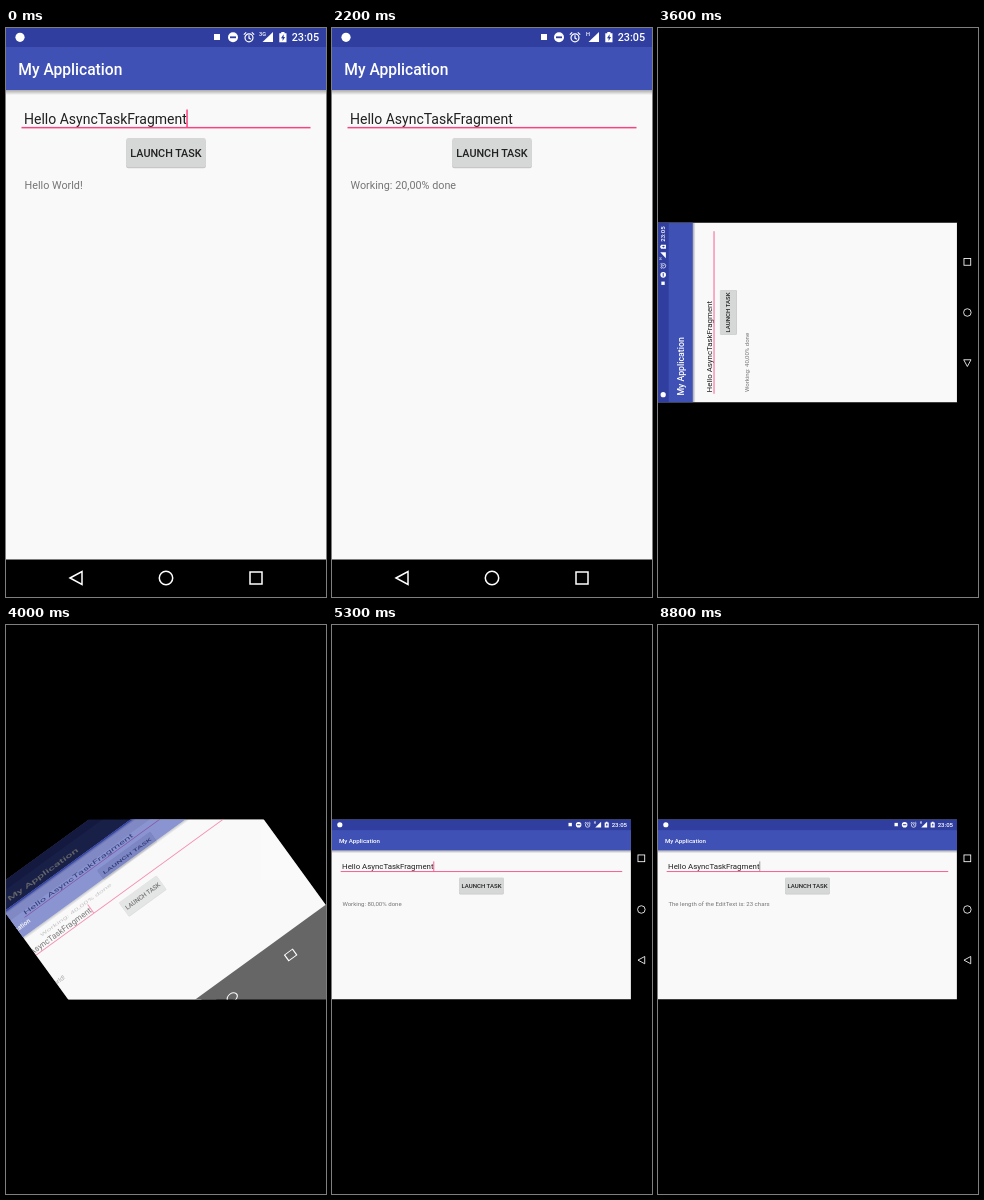
Recreate the animation shown at these times as an HTML page. Size 320 by 569 pixels, loop 8850 ms.

```html
<!DOCTYPE html>
<html lang="en">
<head>
<meta charset="utf-8">
<title>Task demo</title>
<style>
  html, body { margin: 0; height: 100%; overflow: hidden; background: #000; }
  svg { display: block; width: 100vw; height: 100vh; }
  text { font-family: Roboto, "Noto Sans", sans-serif; font-size: 10.8px; }
  .medium { font-weight: 500; }
  .icon { fill: none; stroke: #fff; stroke-width: 1.5; }
</style>
</head>
<body>
<svg id="stage" viewBox="0 0 320 569"></svg>
<script>
const LOOP = 8850, STEP = 50, FIT = 0.5625;
const TURN_START = 3931, TURN_TIME = 412;
const PAPER = '#f9f9f9';
const stage = document.getElementById('stage');
const $ = id => document.getElementById(id);

const back = (x, y) => `<path class="icon" d="M${x - 6} ${y}l12 -6.5v13z"/>`;
const home = (x, y) => `<circle class="icon" cx="${x}" cy="${y}" r="6.7"/>`;
const recent = (x, y) => `<rect class="icon" x="${x - 6}" y="${y - 6}" width="12" height="12"/>`;

const navBottom = `<rect y="531.5" width="320" height="38"/>
  ${back(70, 550)}${home(160, 550)}${recent(250, 550)}`;
const navRight = `<rect x="531.5" width="38" height="320"/>
  ${recent(550, 69)}${home(550, 160)}${back(550, 250)}`;

const statusIcons = id => `
  <rect id="${id}Radio" x="209" y="6" width="6" height="6" fill="#fff"/>
  <circle cx="227" cy="9.3" r="5" fill="#fff"/>
  <rect x="224" y="8.4" width="6" height="1.8" fill="#303f9f"/>
  <g fill="none" stroke="#fff" stroke-width="1.2">
    <circle cx="243" cy="9.8" r="4"/>
    <path d="M243 7.3v2.8l1.8 1.2M237.8 6.6l2.4 -2.2M248.2 6.6l-2.4 -2.2"/>
  </g>
  <text id="${id}Net" class="medium" x="254" y="7.6" fill="#fff" style="font-size:5.6px">H</text>
  <path d="M267 4v10h-10.5z" fill="#fff"/>
  <path d="M273.3 5.2h2v-1.2h3.2v1.2h2v9h-7.2z" fill="#fff"/>
  <path d="M277.6 6.3l-2.6 4h1.6v2.7l2.5 -4h-1.5z" fill="#303f9f"/>
  <text class="medium" x="285.7" y="13.2" fill="#fff">23:05</text>`;

// One app screen; lift is how much shorter its app bar is.
function screen(id, width, height, lift, titleSize, titleY) {
  const bar = 62 - lift, mid = width / 2, button = 110 - lift;
  return `
  <rect width="${width}" height="${height}" fill="${PAPER}"/>
  <rect y="${bar}" width="${width}" height="5" fill="url(#shade)"/>
  <rect width="${width}" height="${bar}" fill="#3f51b5"/>
  <rect width="${width}" height="19" fill="#303f9f"/>
  <circle cx="14" cy="9.3" r="4.6" fill="#fff"/>
  <g transform="translate(${width - 320})">${statusIcons(id)}</g>
  <text class="medium" x="12.3" y="${titleY}" fill="#fff" style="font-size:${titleSize}px">My Application</text>
  <g transform="translate(0 ${-lift})">
    <text x="18" y="95.8" fill="#202020" style="font-size:14px">Hello AsyncTaskFragment</text>
    <rect x="15.5" y="98.9" width="${width - 31}" height="1.5" fill="#f5457f"/>
    <rect id="${id}Cursor" x="180.3" y="81.5" width="1.5" height="17.5" fill="#ff4081"/>
    <text id="${id}Message" x="18.5" y="161.2" fill="#757575"></text>
  </g>
  <rect x="${mid - 39.8}" y="${button + .9}" width="79.6" height="29.4" rx="2" fill="#000" opacity=".2"/>
  <rect x="${mid - 39.5}" y="${button}" width="79" height="29" rx="1.6" fill="#d6d7d7"/>
  <circle id="${id}Ripple" cx="${mid}" cy="${button + 15}" r="0" clip-path="url(#key)" opacity="0"/>
  <text class="medium" x="${mid}" y="${button + 18.8}" text-anchor="middle" fill="#202020">LAUNCH TASK</text>`;
}

stage.innerHTML = `
  <defs>
    <linearGradient id="shade" x2="0" y2="1">
      <stop stop-opacity=".32"/><stop offset="1" stop-opacity="0"/>
    </linearGradient>
    <clipPath id="key"><rect x="120.5" y="110" width="79" height="29" rx="1.6"/></clipPath>
    <clipPath id="wide"><rect y="194.5" width="320" height="180"/></clipPath>
    <clipPath id="frame"><rect id="frameBox" y="-300" height="600"/></clipPath>
    <g id="tallApp">${screen('tall', 320, 532, 0, 15.6, 46.8)}</g>
  </defs>
  <rect width="320" height="569"/>
  <g id="upright">
    <rect width="320" height="532" fill="${PAPER}"/>
    <use id="uprightApp" href="#tallApp"/>
    ${navBottom}
  </g>
  <g id="turned" clip-path="url(#wide)">
    <g id="fresh"><g clip-path="url(#frame)"><g id="freshScale">
      <g transform="scale(${FIT}) translate(-284.5 -160)">
        ${screen('wide', 531.5, 320, 7, 11, 41.2)}${navRight}
      </g>
    </g></g></g>
    <g id="stale"><use href="#tallApp"/>${navBottom}</g>
    <g id="looseNav">
      <rect id="looseBar" y="90" height="110" fill="#666"/>
      <g transform="translate(2 110) scale(.82 .6)">
        ${back(-88, 0)}${home(0, 0)}${recent(88, 0)}
      </g>
    </g>
  </g>`;

const show = (id, on) => $(id).setAttribute('display', on ? 'inline' : 'none');
const set = (id, attrs) => {
  for (const key in attrs) $(id).setAttribute(key, attrs[key]);
};
const write = (id, text) => {
  if ($(id).textContent !== text) $(id).textContent = text;
};
// Value of the last [time, value] pair already reached.
const at = (steps, t) => steps.filter(s => s[0] <= t).pop()[1];
const working = n => `Working: ${n},00% done`;

const tallMessages = [
  [0, 'Hello World!'], [1150, 'Will now start the task, please wait...'],
  [2050, working(20)], [3100, working(40)]
];
const wideMessages = [
  [0, 'Hello World!'], [4100, working(60)], [5100, working(80)],
  [6150, working(100)], [6200, 'The length of the EditText is: 23 chars']
];

function drawTall(t) {
  const cursorOn = t < 200 || (t < 3200 && (t - 200) % 1000 >= 500);
  show('tallCursor', cursorOn);
  write('tallMessage', at(tallMessages, t));
  const early = t < 500;
  write('tallNet', early ? '3G' : 'H');
  set('tallRadio', { x: early ? 208 : 209 });
  set('tallNet', { x: early ? 253 : 254 });
  const press = (t - 850) / 550;
  const pressed = press > 0 && press < 1;
  set('tallRipple', {
    r: pressed ? 48 * Math.min(1, press * 1.8) : 0,
    opacity: pressed ? 0.16 * Math.min(1, 2 * (1 - press)) : 0
  });
  set('uprightApp', { transform: t < 3550 ? '' : 'translate(0 320) rotate(-90)' });
}

function drawWide(t) {
  const u = Math.min(1, Math.max(0, (t - TURN_START) / TURN_TIME));
  const p = 1 - (1 - u) ** 5;
  const turn = `translate(160 284.5) rotate(${-90 * (1 - p)})`;
  const sx = FIT + (1 - FIT) * p;
  const sy = 1 / FIT + (1 - 1 / FIT) * p;
  const loose = u > 0 && t < 4050;

  show('fresh', u > 0);
  set('fresh', { transform: turn });
  set('freshScale', { transform: loose ? 'scale(1.04)' : `scale(${sx} ${sy})` });
  set('frameBox', { x: -160 * sx, width: 320 * sx });

  show('stale', u < 1);
  set('stale', {
    transform: `${turn} scale(${FIT * (1 + (1 / FIT - 1) * p)} ${FIT * (1 + (FIT - 1) * p)}) translate(-160 -284.5)`,
    opacity: 1 - p
  });

  show('looseNav', loose);
  set('looseNav', { transform: turn });
  set('looseBar', { x: -160 * sx, width: 320 * sx });

  write('wideMessage', at(wideMessages, t));
  const cursorOn = t < 4800 || (t - 4800) % 1000 >= 500;
  set('wideCursor', { fill: cursorOn ? '#ff4081' : '#8a8a8a' });
}

let start;
function draw(now) {
  start ??= now;
  const t = Math.floor(((now - start) % LOOP) / STEP) * STEP;
  show('upright', t < 3600);
  show('turned', t >= 3600);
  drawTall(Math.min(t, 3599));
  if (t >= 3600) drawWide(t);
  requestAnimationFrame(draw);
}
requestAnimationFrame(draw);
</script>
</body>
</html>
```
